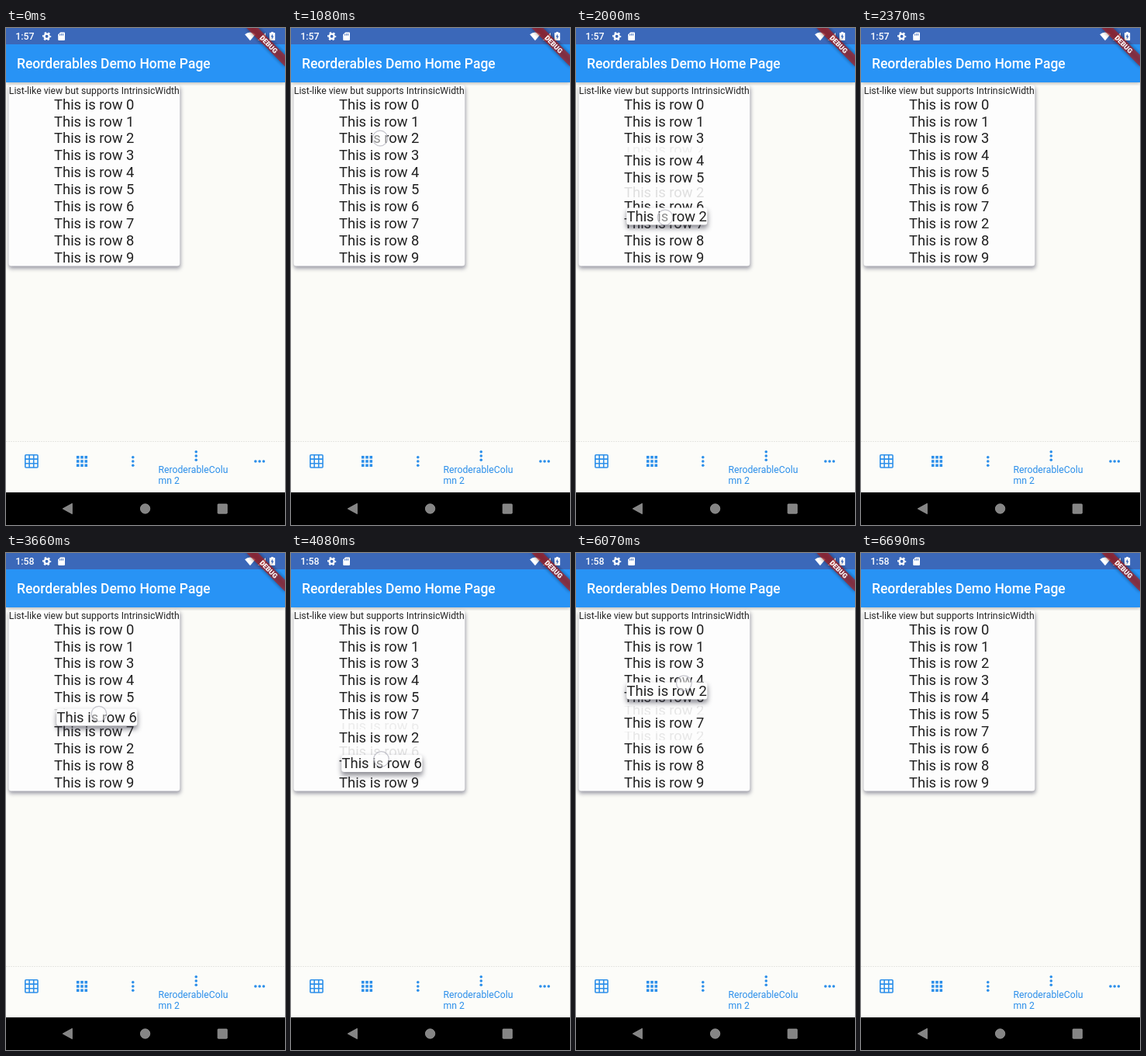
An HTML page that plays this animation: 360 px wide and 640 px high, repeating every 7110 ms.

```html
<!DOCTYPE html>
<html lang="en">
<head>
<meta charset="utf-8">
<title>Reorderable list</title>
<style>
html, body { margin: 0; width: 100%; height: 100%; overflow: hidden; background: #fbfbf7; }
svg { display: block; }
#stage { width: 100vw; height: 100vh; }
text { font-family: Roboto, sans-serif; white-space: pre; }
.row { font-size: 18.4px; fill: #212121; text-anchor: middle; }
.small { font-size: 12.26px; }
</style>
</head>
<body>
<svg id="stage" viewBox="0 0 360 640" xmlns="http://www.w3.org/2000/svg">
  <defs>
    <filter id="soft" x="-30%" y="-30%" width="160%" height="160%"><feGaussianBlur stdDeviation="2.4"/></filter>
    <filter id="lift" x="-20%" y="-80%" width="140%" height="260%"><feGaussianBlur stdDeviation="3"/></filter>
    <clipPath id="body"><rect y="70" width="360" height="528"/></clipPath>
  </defs>
  <rect width="360" height="640" fill="#fbfbf7"/>

  <g clip-path="url(#body)">
    <rect x="0" y="64" width="360" height="7" fill="#000" opacity=".3" filter="url(#soft)"/>
    <rect x="3.5" y="76" width="222" height="234" rx="4" fill="#46465f" opacity=".5" filter="url(#soft)"/>
    <rect x="3.5" y="73.5" width="220.8" height="233" rx="3.5" fill="#fdfdfd"/>
    <text class="small" x="3.8" y="84.9" fill="#262626">List-like view but supports IntrinsicWidth</text>
    <g id="list"></g>
    <g id="held">
      <rect x="65" y="3.5" width="105" height="23" rx="4" fill="#303040" opacity=".55" filter="url(#lift)"/>
      <rect x="65.2" width="104.2" height="21.9" rx="3.5" fill="#fdfdfd"/>
      <text class="row" x="117.25" y="17.1"></text>
    </g>
  </g>

  <rect y="20" width="360" height="50" fill="#2893f5"/>
  <rect width="360" height="21" fill="#3b68b9"/>
  <text x="14" y="51.8" font-size="17.5" font-weight="500" fill="#fff">Reorderables Demo Home Page</text>
  <g fill="#fff">
    <text id="clock" x="12.3" y="15" font-size="12.3" font-weight="500"></text>
    <g fill="none" stroke="#fff">
      <circle cx="52.6" cy="10.7" r="3.1" stroke-width="2.3"/>
      <circle cx="52.6" cy="10.7" r="4.8" stroke-width="1.7" stroke-dasharray="2.4 2.627" stroke-dashoffset="1.2"/>
    </g>
    <path d="M70.2 5.5H75.2Q76 5.5 76 6.3V15.1Q76 15.9 75.2 15.9H68Q67.2 15.9 67.2 15.1V8.5Z"/>
    <path d="M69.6 7.7v2M71.6 7.2v2.5M73.6 7.2v2.5" stroke="#3b68b9"/>
    <path d="M308.2 8.2Q315 2.7 321.8 8.2L315 16.2Z"/>
    <path d="M325 16L335 6V16Z"/>
    <path d="M342.2 5h2.8v1.1h1.5q.7 0 .7.7v8.5q0 .7-.7.7h-5.8q-.7 0-.7-.7V6.8q0-.7.7-.7h1.5Z"/>
    <path d="M344.1 7.6L341.6 11.6H343.2V14.5L345.6 10.5H344.1Z" fill="#3b68b9"/>
  </g>

  <g transform="translate(360 0) rotate(45)">
    <rect x="-35" y="24.5" width="70" height="10.5" fill="#000" opacity=".45" filter="url(#soft)"/>
    <rect x="-35" y="24.5" width="70" height="10.5" fill="#b71c1c" fill-opacity=".66"/>
    <text y="32.9" font-size="8.9" font-weight="900" fill="#fff" text-anchor="middle">DEBUG</text>
  </g>

  <rect y="532" width="360" height="66" fill="#fcfcf9"/>
  <path d="M0 532.5H360" stroke="#e6e6e2" stroke-dasharray="2 1"/>
  <g id="tabs" fill="#2c8fea">
    <g fill="none" stroke="#2c8fea" stroke-width="1.6">
      <rect x="24.8" y="549.8" width="16.2" height="16.2" rx="1"/>
      <path d="M30.1 550v16M35.7 550v16M25 555.1h16M25 560.7h16"/>
    </g>
    <text class="small" x="196.4" y="573">ReroderableColu</text>
    <text class="small" x="196.4" y="587">mn 2</text>
  </g>

  <rect y="598" width="360" height="42" fill="#000"/>
  <g fill="#858585" stroke="#999" stroke-width=".8" stroke-linejoin="round">
    <path d="M73.2 619L85.4 612.3V625.7Z"/>
    <circle cx="179.6" cy="619" r="6.2"/>
    <rect x="273.2" y="613" width="12.2" height="12.2" rx=".8"/>
  </g>
  <circle id="touch" r="9.8" fill="#fff" fill-opacity=".5" stroke="#8c8c9c" stroke-opacity=".5" stroke-width="1.2"/>
</svg>

<script>
const LOOP = 7110, TOP = 87.5, H = 21.9, BASE = 17.1, MID = 113.75, SHIFT = 3.5, SWAP = 200;
const NS = 'http://www.w3.org/2000/svg';
const $ = id => document.getElementById(id);
const clamp = v => Math.min(1, Math.max(0, v));
const ramp = (t, a, b) => clamp((t - a) / (b - a));
const smooth = x => x * x * (3 - 2 * x);
const easeOut = x => 1 - (1 - x) ** 2;

// lead: how far the touch dot runs ahead of the carried row, in ms
const drags = [
  { from: 2, to: 7, lift: 1520, drop: 2250, start: 1613, span: 450, dy: 102, ease: smooth, lead: 53,
    x: [115, 115], y: 142, press: [900, 940], fade: [2250, 2370], gone: 2370,
    swaps: [[1666, 3], [1866, 5], [2066, 7]] },
  { from: 5, to: 7, lift: 3660, drop: 4280, start: 3680, span: 380, dy: 59.5, ease: smooth, lead: 50,
    x: [120, 116.5], y: 206, press: [2830, 2950], fade: [4200, 4320], gone: 5070, rest: .25,
    swaps: [[3756, 6], [3956, 7]] },
  { from: 6, to: 2, lift: 5910, drop: 6610, start: 5910, span: 462, dy: -97, ease: easeOut, lead: 33,
    x: [139, 139.5], y: 232, press: [5570, 5610], fade: [6610, 6690], gone: 6690,
    swaps: [[5970, 5], [6170, 3], [6370, 2]] }
];

function add(parent, tag, attrs) {
  const el = parent.appendChild(document.createElementNS(NS, tag));
  for (const k in attrs) el.setAttribute(k, attrs[k]);
  return el;
}

const label = n => 'This is row ' + n;
const rows = Array.from({ length: 10 }, (_, n) => {
  const el = add($('list'), 'text', { class: 'row', x: MID });
  el.textContent = label(n);
  return el;
});
const ghosts = [0, 1].map(() => {
  const box = add($('list'), 'svg', { x: 0, width: 360, overflow: 'hidden' });
  return { box, text: add(box, 'text', { class: 'row', x: MID }) };
});

function drawTabs() {
  const tabs = $('tabs'), steps = [-1, 0, 1];
  const dot = (cx, cy) => add(tabs, 'circle', { cx, cy, r: 1.8 });
  for (const i of steps) {
    for (const j of steps) {
      add(tabs, 'rect', { x: 96.2 + i * 5.25, y: 556.2 + j * 5.25, width: 3.6, height: 3.6 });
    }
    dot(163.8, 558 + i * 5.25);
    dot(245.3, 551 + i * 5.25);
    dot(327.2 + i * 5.25, 558);
  }
}

function place(n, slot) {
  rows[n].setAttribute('y', TOP + slot * H + BASE);
}

// The old gap closes while the new one opens.
function gapsAt(d, t) {
  let prev = d.from, now = d.from, f = 1;
  for (const [at, to] of d.swaps) {
    if (t >= at) {
      prev = now;
      now = to;
      f = clamp((t - at) / SWAP);
    }
  }
  return [{ at: prev, size: 1 - f }, { at: now, size: f }];
}

function drawGhost(g, gap, other, n) {
  const slot = gap.at + (other.at < gap.at ? other.size : 0), h = gap.size * H;
  g.box.style.display = h > .01 ? '' : 'none';
  g.box.setAttribute('y', TOP + slot * H);
  g.box.setAttribute('height', h);
  g.text.textContent = label(n);
  g.text.setAttribute('y', BASE + (h - H) / 2);
  g.text.setAttribute('opacity', .2 * gap.size);
}

function drawList(t) {
  let order = rows.map((_, n) => n), active = null;
  for (const d of drags) {
    if (t < d.lift) break;
    const [n] = order.splice(d.from, 1);
    if (t < d.drop) {
      active = { d, n };
      break;
    }
    order.splice(d.to, 0, n);
  }
  const gaps = active ? gapsAt(active.d, t) : [];
  order.forEach((n, k) => place(n, gaps.reduce((s, g) => s + (g.at <= k ? g.size : 0), k)));
  rows.forEach((el, n) => el.style.display = active && active.n === n ? 'none' : '');
  ghosts.forEach((g, i) => {
    if (active) drawGhost(g, gaps[i], gaps[1 - i], active.n);
    else g.box.style.display = 'none';
  });

  const held = $('held');
  held.style.display = active ? '' : 'none';
  if (active) {
    const { d, n } = active;
    const y = TOP + d.from * H + SHIFT + d.dy * d.ease(ramp(t, d.start, d.start + d.span));
    held.setAttribute('transform', `translate(0 ${y})`);
    held.lastElementChild.textContent = label(n);
  }
}

function drawTouch(t) {
  const touch = $('touch');
  const d = drags.find(d => t >= d.press[0] && t < d.gone);
  touch.style.display = d ? '' : 'none';
  if (!d) return;
  const p = d.ease(ramp(t + d.lead, d.start, d.start + d.span) * (t >= d.lift));
  const rest = d.rest || 0;
  touch.setAttribute('cx', d.x[0] + (d.x[1] - d.x[0]) * p);
  touch.setAttribute('cy', d.y + d.dy * p);
  touch.setAttribute('opacity', ramp(t, ...d.press) * (1 - (1 - rest) * ramp(t, ...d.fade)));
}

function draw(t) {
  $('clock').textContent = t < 2870 ? '1:57' : '1:58';
  drawList(t);
  drawTouch(t);
}

drawTabs();
draw(0);
const began = performance.now();
function tick() {
  draw((performance.now() - began) % LOOP);
  requestAnimationFrame(tick);
}
requestAnimationFrame(tick);
</script>
</body>
</html>
```
